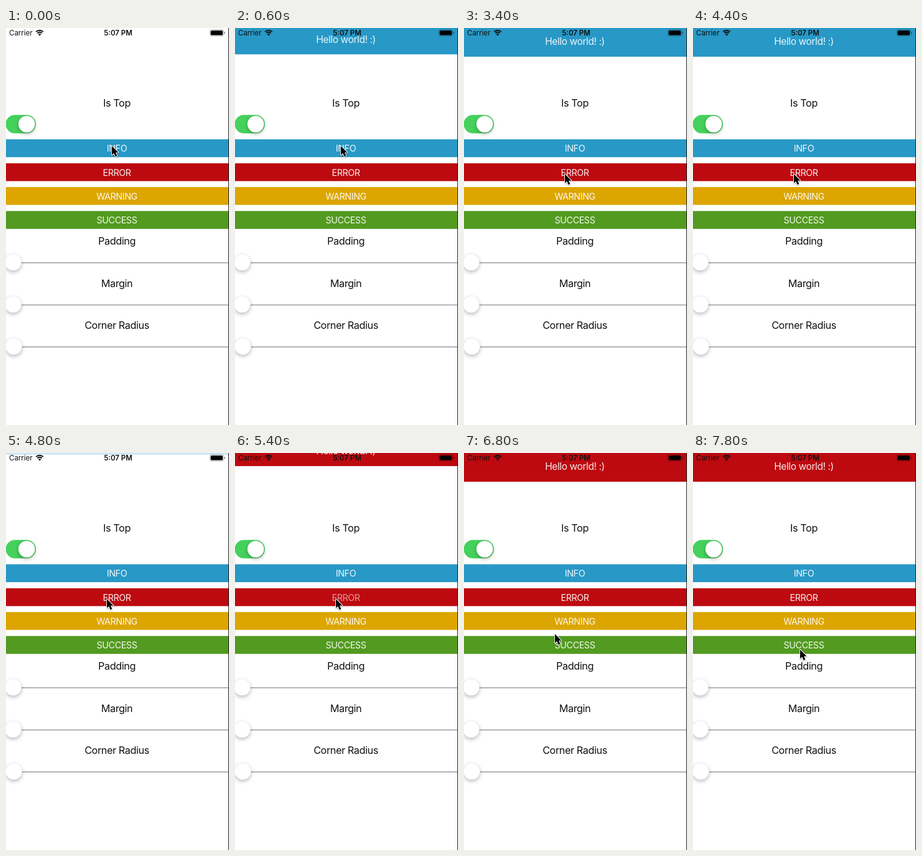
Recreate the animation shown at these times as an HTML page with a canvas. Size 358 by 636 pixels, loop 8000 ms.

```html
<!DOCTYPE html>
<html lang="en">
<head>
<meta charset="utf-8">
<title>Banner demo</title>
<style>
html, body { margin: 0; width: 100%; height: 100%; overflow: hidden; background: #fff; }
canvas { display: block; width: 358px; height: 636px; }
</style>
</head>
<body>
<canvas id="stage"></canvas>
<script>
const W = 358, H = 636, LOOP = 8000, STEP = 200;
const BLUE = '#2898c6', RED = '#bc0a10';
const FONT = 'Inter, Roboto, sans-serif';
const canvas = document.getElementById('stage');
const ctx = canvas.getContext('2d');
const dpr = window.devicePixelRatio || 1;
canvas.width = W * dpr;
canvas.height = H * dpr;

const buttons = [
  ['INFO', 178.3, BLUE],
  ['ERROR', 216.7, RED],
  ['WARNING', 254.8, '#dca500'],
  ['SUCCESS', 293.2, '#529a20']
];
const sliders = [['Padding', 341.5, 11.5], ['Margin', 409, 11.5], ['Corner Radius', 476.3, 12.5]];

// Pointer tip: time, x, y
const pointerPath = [
  [1600, 170, 189], [2000, 167, 214], [2400, 163, 258], [2800, 161, 270],
  [3400, 162, 234], [5600, 162, 234], [6000, 158, 270], [6800, 146, 290],
  [7200, 147, 296], [7800, 172, 315]
];

const clamp = v => Math.max(0, Math.min(1, v));
const mix = (a, b, p) => a + (b - a) * p;
function ease(t, start, length) {
  const p = clamp((t - start) / length);
  return p * p * (3 - 2 * p);
}

function pointerAt(t) {
  let a = pointerPath[0];
  for (const b of pointerPath) {
    if (t < b[0]) {
      const p = a === b ? 0 : ease(t, a[0], b[0] - a[0]);
      return [mix(a[1], b[1], p), mix(a[2], b[2], p)];
    }
    a = b;
  }
  return [a[1], a[2]];
}

function text(str, x, y, size, color, weight = 400, align = 'center', spacing = -0.4) {
  ctx.font = `${weight} ${size}px ${FONT}`;
  ctx.letterSpacing = spacing + 'px';
  ctx.textAlign = align;
  ctx.textBaseline = 'alphabetic';
  ctx.fillStyle = color;
  ctx.fillText(str, x, y);
}

function box(x, y, w, h, r, color) {
  ctx.fillStyle = color;
  ctx.beginPath();
  ctx.roundRect(x, y, w, h, r);
  ctx.fill();
}

function knob(x, y) {
  ctx.save();
  ctx.shadowColor = 'rgba(0,0,0,0.28)';
  ctx.shadowBlur = 6 * dpr;
  ctx.shadowOffsetY = 2.5 * dpr;
  ctx.fillStyle = '#fff';
  ctx.beginPath();
  ctx.arc(x, y, 13.3, 0, Math.PI * 2);
  ctx.fill();
  ctx.restore();
  ctx.strokeStyle = 'rgba(0,0,0,0.06)';
  ctx.lineWidth = 0.6;
  ctx.stroke();
}

// Label alpha while a button is held and released
function labelAlpha(name, t) {
  const press = { INFO: 200, ERROR: 5200 }[name];
  if (press === undefined || t < press || t > press + 500) return 0.93;
  return mix(0.25, 0.93, clamp((t - press) / 400));
}

function drawControls(t) {
  text('Is Top', 178, 125.5, 16.2, '#111');
  box(-0.5, 139.2, 48.5, 29.6, 14.8, '#45d15c');
  knob(33.2, 154);
  for (const [name, y, color] of buttons) {
    ctx.fillStyle = color;
    ctx.fillRect(0, y, W, 28.6);
    text(name, 178, y + 19.8, 14.3, `rgba(255,255,255,${labelAlpha(name, t)})`);
  }
  for (const [name, y, x] of sliders) {
    text(name, 178, y + 5.5, 16.2, '#111');
    ctx.fillStyle = '#b0b0b0';
    ctx.fillRect(x, y + 33.7, W - x, 1.9);
    knob(x, y + 33.8);
  }
}

function drawBanner(color, shown) {
  const visible = 46 * shown;
  if (visible <= 0) return;
  ctx.save();
  ctx.globalAlpha = clamp(visible / 10);
  ctx.translate(0, visible - 46);
  ctx.fillStyle = color;
  ctx.fillRect(0, 0, W, 46);
  text('Hello world! :)', 178, 27.3, 15.5, 'rgba(255,255,255,0.9)');
  ctx.restore();
}

function drawStatus() {
  text('Carrier', 5, 12.2, 11.5, '#111', 400, 'left', 0);
  text('5:07 PM', 180, 12.2, 11.5, '#111', 600, 'center', 0);
  ctx.strokeStyle = '#111';
  ctx.lineWidth = 1.9;
  for (const r of [8.2, 5.2]) {
    ctx.beginPath();
    ctx.arc(54, 12, r, -Math.PI * 0.75, -Math.PI * 0.25);
    ctx.stroke();
  }
  ctx.fillStyle = '#111';
  ctx.beginPath();
  ctx.moveTo(54, 12.4);
  ctx.arc(54, 12.4, 3.2, -Math.PI * 0.75, -Math.PI * 0.25);
  ctx.fill();
  ctx.strokeStyle = 'rgba(0,0,0,0.4)';
  ctx.lineWidth = 0.8;
  ctx.beginPath();
  ctx.roundRect(327.3, 2.6, 22, 10.2, 2.6);
  ctx.stroke();
  box(328.6, 3.9, 19.4, 7.6, 1.5, '#000');
  box(350.2, 6, 1.3, 3.5, 0.6, 'rgba(0,0,0,0.5)');
}

function drawPointer(x, y) {
  ctx.save();
  ctx.translate(x, y);
  ctx.beginPath();
  ctx.moveTo(0, 0);
  ctx.lineTo(0, 14.6);
  ctx.lineTo(3.2, 11.6);
  ctx.lineTo(5.6, 17);
  ctx.lineTo(8.3, 15.8);
  ctx.lineTo(6, 10.6);
  ctx.lineTo(10.4, 10.4);
  ctx.closePath();
  ctx.shadowColor = 'rgba(0,0,0,0.35)';
  ctx.shadowBlur = 2 * dpr;
  ctx.shadowOffsetY = dpr;
  ctx.lineJoin = 'round';
  ctx.lineWidth = 1.8;
  ctx.strokeStyle = '#fff';
  ctx.stroke();
  ctx.shadowColor = 'transparent';
  ctx.fillStyle = '#000';
  ctx.fill();
  ctx.restore();
}

function draw(t) {
  ctx.setTransform(dpr, 0, 0, dpr, 0, 0);
  ctx.fillStyle = '#fff';
  ctx.fillRect(0, 0, W, H);
  drawControls(t);
  drawBanner(BLUE, ease(t, 250, 425) - ease(t, 4440, 420));
  drawBanner(RED, ease(t, 5200, 425));
  drawStatus();
  ctx.fillStyle = '#222';
  ctx.fillRect(357, 0, 1, H);
  drawPointer(...pointerAt(t));
}

const start = performance.now();
function tick() {
  const t = (performance.now() - start) % LOOP;
  draw(Math.floor(t / STEP) * STEP);
  requestAnimationFrame(tick);
}
tick();
</script>
</body>
</html>
```
